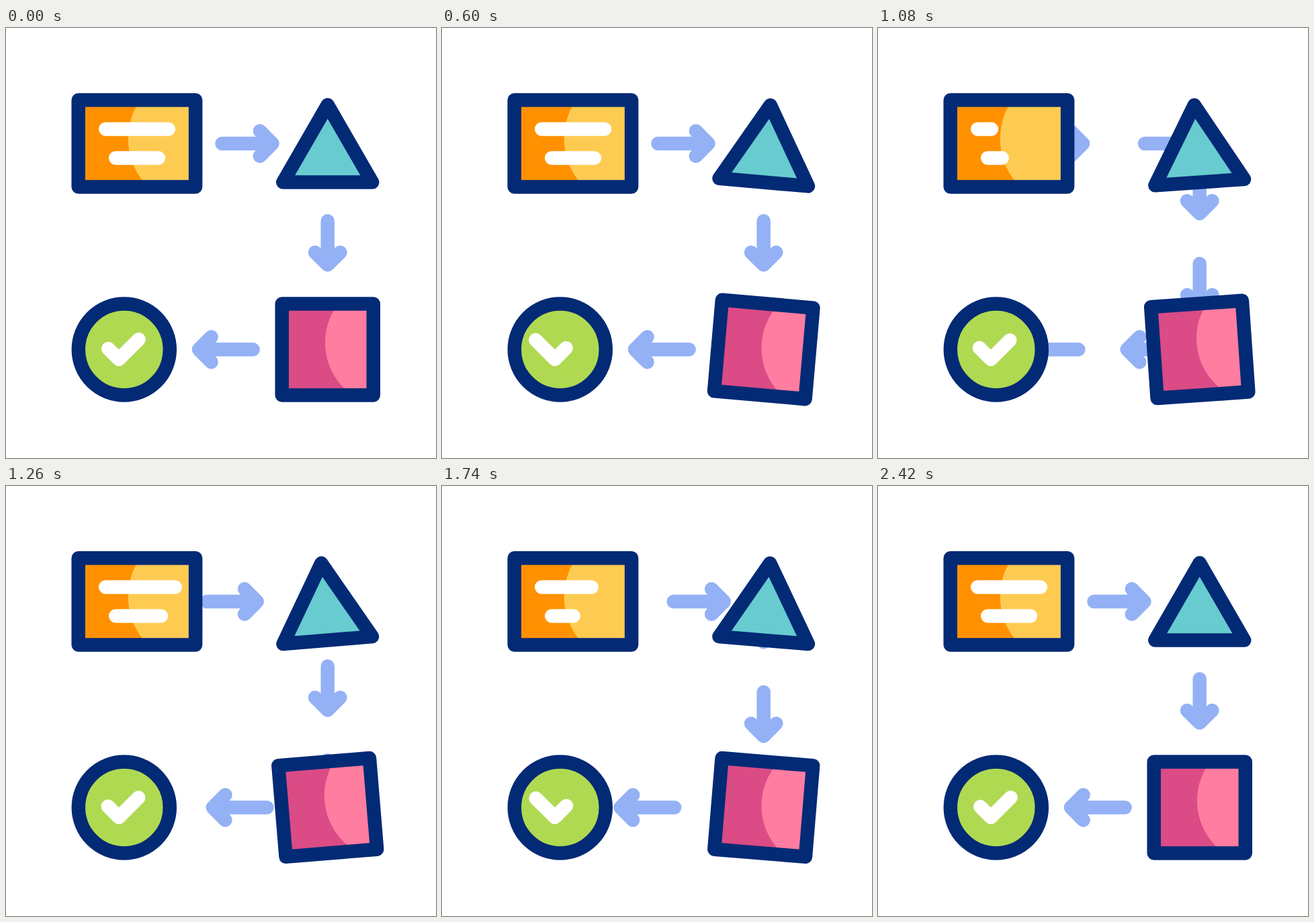
An HTML page for the animation above (2.62 s loop, 640 px wide and 640 px high).

```html
<!DOCTYPE html>
<html lang="en">
<head>
<meta charset="utf-8">
<title>Workflow</title>
<style>
  html, body { margin: 0; width: 100%; height: 100%; overflow: hidden; background: #fff; }
  svg { display: block; width: 100%; height: 100%; }
  path, rect, circle { stroke-width: 20.5; stroke-linecap: round; stroke-linejoin: round; }
  .outline { fill: none; stroke: #032a75; }
  .arrow { fill: none; stroke: #94b1f5; }
  .mark { fill: none; stroke: #fff; }
  .flat { stroke: none; }
</style>
</head>
<body>
<svg viewBox="0 0 640 640">
  <defs>
    <clipPath id="half"><path d="M0 0H482V640H0Z"/></clipPath>
    <path id="right" d="M321.4 172H396.5M377.8 153.3L396.5 172L377.8 190.7"/>
    <path id="down" d="M478.7 287.3V352.6M460 333.9L478.7 352.6L497.4 333.9"/>
    <path id="left" d="M367.6 478.5H286.9M305.6 459.8L286.9 478.5L305.6 497.2"/>
  </defs>

  <g class="arrow">
    <g clip-path="url(#half)"><g id="moveRight"><use href="#right"/><use href="#right" x="-167"/></g></g>
    <g id="moveDown"><use href="#down"/><use href="#down" y="-140"/></g>
    <g id="moveLeft"><use href="#left"/><use href="#left" x="153"/></g>
  </g>

  <path class="flat" fill="#ff9100" d="M108 107H282V237H108Z"/>
  <path class="flat" fill="#fecb52" d="M193.8 117A101 101 0 0 0 203.5 227.5H282V117Z"/>
  <rect class="outline" x="107.7" y="107.3" width="174.4" height="129.3"/>
  <path class="mark" id="topBar"/>
  <path class="mark" id="bottomBar"/>

  <path class="outline" id="triangle" style="fill:#67cbd0" d="M478.7 114.5L545.2 229.6H412.2Z"/>

  <g id="square">
    <path class="flat" fill="#db4b85" d="M411 411H547V547H411Z"/>
    <path class="flat" fill="#ff7da0" d="M488.3 419.5A96 96 0 0 0 504.3 537.5H547V419.5Z"/>
    <rect class="outline" x="410.7" y="410.4" width="136.1" height="136.1"/>
  </g>

  <circle class="outline" style="fill:#b0d952" cx="175.8" cy="478.5" r="68"/>
  <path class="mark" id="check"/>
</svg>
<script>
const LOOP = 2620, ACTIVE = 2400, CYCLE = 800;
const el = id => document.getElementById(id);
const set = (id, name, value) => el(id).setAttribute(name, value);

// Eased value from a list of [time, value] keys
function keyed(keys, t) {
  if (t <= keys[0][0]) return keys[0][1];
  for (let i = 1; i < keys.length; i++) {
    const [t0, a] = keys[i - 1], [t1, b] = keys[i];
    if (t < t1) {
      const x = (t - t0) / (t1 - t0);
      return a + (b - a) * x * x * (3 - 2 * x);
    }
  }
  return keys[keys.length - 1][1];
}

const travel = [[0, 0], [600, 1]];
const tilt = [[0, 0], [600, 5], [1200, -5], [1800, 5], [2400, 0]];
const slide = [[0, 0], [600, 12.9], [1200, 0]];
const barLength = [[0, 1], [245, 0.2], [392, 1.107], [550, 1]];

function draw(time) {
  const t = Math.min(time % LOOP, ACTIVE);
  const u = t % CYCLE;

  const p = keyed(travel, u);
  set('moveRight', 'transform', `translate(${167 * p} 0)`);
  set('moveDown', 'transform', `translate(0 ${140 * p})`);
  set('moveLeft', 'transform', `translate(${-153 * p} 0)`);

  set('topBar', 'd', `M148.2 150.5h${93.6 * keyed(barLength, u - 60)}`);
  set('bottomBar', 'd', `M163.2 193.5h${63.7 * keyed(barLength, u)}`);

  const angle = keyed(tilt, t);
  set('triangle', 'transform', `rotate(${angle} 478.7 229.6)`);
  set('square', 'transform', `rotate(${angle} 478.7 478.5)`);

  // The tick slides along its own V-shaped path
  const s = keyed(slide, t % 1200), a = 15.8 + s, b = 29.6 - s;
  set('check', 'd', `M${168 - a} ${493 - a}L168 493L${168 + b} ${493 - b}`);
}

const start = performance.now();
function frame() {
  draw(performance.now() - start);
  requestAnimationFrame(frame);
}
frame();
</script>
</body>
</html>
```
